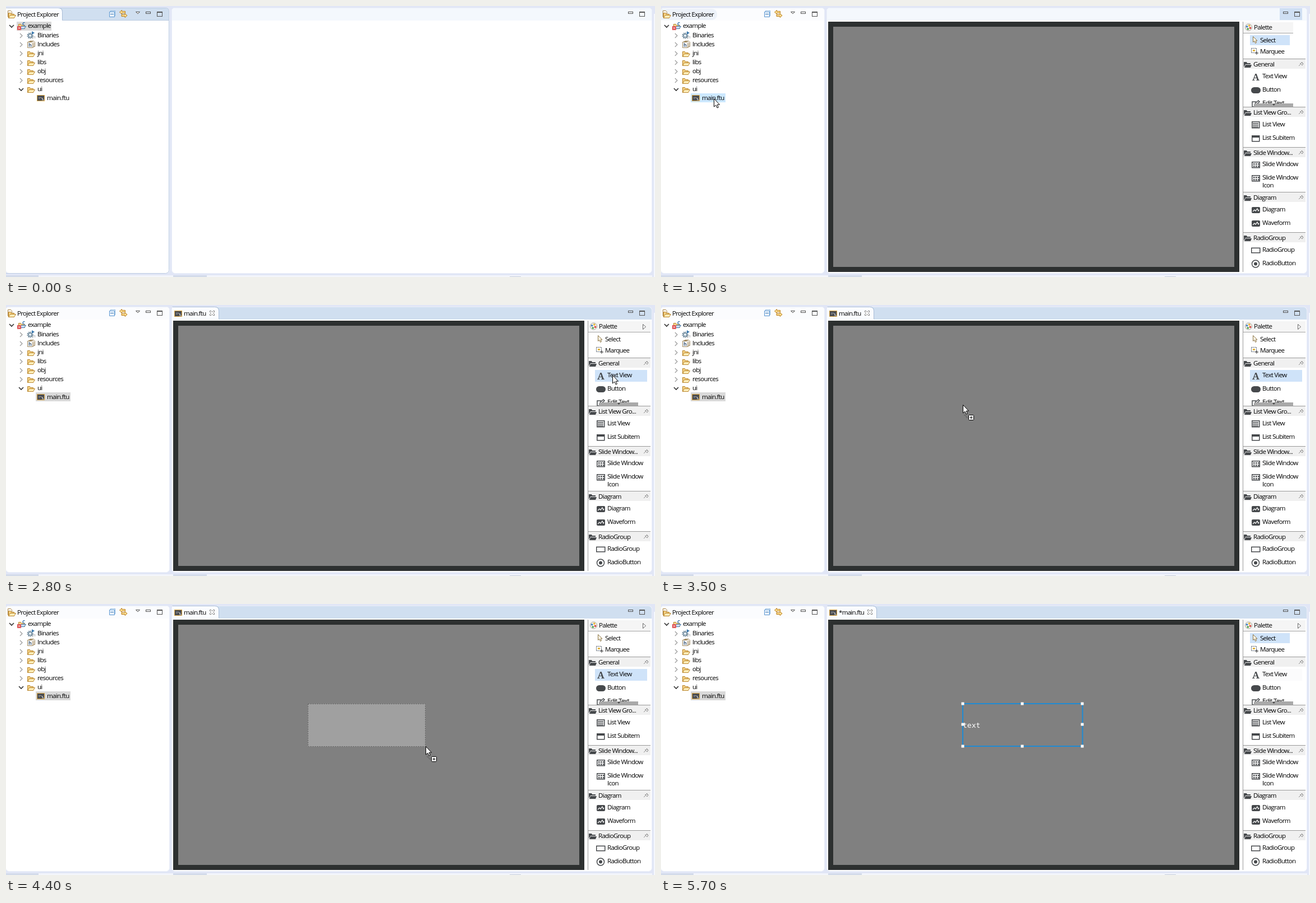
An HTML page with a canvas that plays this animation: 1157 px wide and 484 px high, repeating every 6.5 s.

```html
<!DOCTYPE html>
<html lang="en">
<head>
<meta charset="utf-8">
<title>Adding a text view</title>
<style>
  html, body { margin: 0; width: 100%; height: 100%; overflow: hidden; background: #e1e6f6; }
  canvas { display: block; }
</style>
</head>
<body>
<canvas id="stage" width="1157" height="484"></canvas>
<script>
const LOOP = 6500, STEP = 100;
const ctx = document.getElementById('stage').getContext('2d');

// Pointer legs: start time, then one x,y pair per step; the last pair holds.
const legs = [
  [100, 967,80],
  [300, 720,115, 340,160, 280,160, 177,165, 115,169, 94,165],
  [1600, 115,170, 177,166],
  [2000, 290,175, 460,198, 660,204, 850,194, 980,170, 1056,140, 1079,127],
  [2700, 1081,125],
  [3000, 1040,150, 900,174, 740,187, 620,188, 556,182, 538,178],
  [3700, 575,198, 640,232, 698,255, 727,262, 736,262, 742,260, 745,257],
  [4400, 748,254, 750,252],
  [5300, 786,249],
  [5600, 1146,225]
];

function pointerAt(t) {
  const [start, ...points] = legs.filter(leg => leg[0] <= t).pop();
  const i = Math.min(Math.floor((t - start) / STEP), points.length / 2 - 1);
  return [points[2 * i], points[2 * i + 1]];
}

function rect(color, x, y, w, h) {
  ctx.fillStyle = color;
  ctx.fillRect(x, y, w, h);
}

function box(color, x, y, w, h, width = 1) {
  ctx.strokeStyle = color;
  ctx.lineWidth = width;
  ctx.strokeRect(x, y, w, h);
}

function shape(d, x, y, fill, stroke, width = 1) {
  const path = new Path2D(d);
  ctx.save();
  ctx.translate(x, y);
  ctx.lineWidth = width;
  if (fill) { ctx.fillStyle = fill; ctx.fill(path); }
  if (stroke) { ctx.strokeStyle = stroke; ctx.stroke(path); }
  ctx.restore();
}

function rounded(x, y, w, h, radii, fill, stroke) {
  ctx.beginPath();
  ctx.roundRect(x, y, w, h, radii);
  if (fill) { ctx.fillStyle = fill; ctx.fill(); }
  if (stroke) { ctx.strokeStyle = stroke; ctx.lineWidth = 1; ctx.stroke(); }
}

function disc(x, y, r, fill, stroke, width = 1) {
  ctx.beginPath();
  ctx.arc(x, y, r, 0, 7);
  if (fill) { ctx.fillStyle = fill; ctx.fill(); }
  if (stroke) { ctx.strokeStyle = stroke; ctx.lineWidth = width; ctx.stroke(); }
}

function text(s, x, y, font = '11.5px "Open Sans", sans-serif', color = '#000', spacing = '-0.7px') {
  ctx.font = font;
  ctx.letterSpacing = spacing;
  ctx.fillStyle = color;
  ctx.fillText(s, x, y);
}

function windowButtons(x) {
  box('#555', x + .5, 10.5, 8, 3);
  box('#555', x + 20.5, 10.5, 9, 8);
  rect('#555', x + 20, 10, 10, 2);
}

function panel(x, w, header) {
  rounded(x + .5, 3.5, w, 474, [5, 5, 6, 6], '#fff', '#e9eef8');
  rounded(x + 1, 4, w - 1, 22, [5, 5, 0, 0], header);
}

function tab(x, w) {
  const d = `M0 22V0H${w - 7}q7 0 7 7V22z`;
  shape(d, x, 4, '#fafcff');
  shape(`M0 0H${w - 7}q7 0 7 7V22`, x + .5, 3.5, null, '#a9bcd6');
}

function fileIcon(x, y) {
  rect('#d9a441', x, y, 14, 11);
  rect('#4a4c50', x + 1, y + 1, 12, 9);
  rect('#9a9ca0', x + 3, y + 4, 5, 1);
  rect('#85878b', x + 3, y + 6, 3, 1);
  shape('M8 5l5 5M10 5v5', x, y, null, '#c9c9c9');
}

function treeFolder(x, y) {
  shape('M.5 10.5v-9h4l1 2h5v7z', x, y, '#f3d083', '#b9862f');
  shape('M.5 10.5l3-5h10l-3 5z', x, y, '#ffedb8', '#b9862f');
}

function chevron(x, y, open) {
  if (open) shape('M-4-2l4 4 4-4', x, y, null, '#333', 1.6);
  else shape('M-2-4l4 4-4 4', x, y, null, '#999', 1.2);
}

function explorer(t) {
  const active = t < 1500;
  panel(-1, 292, active ? '#d0dff0' : '#fbfcfe');
  if (active) {
    tab(-1, 101);
    rect('#b9c9df', 100, 25, 191, 1);
    rounded(-.5, 3.5, 291, 474, [0, 5, 6, 0], null, '#bccbe2');
  } else if (t < 1600) {
    rounded(0, 5, 100, 20, [0, 9, 9, 0], '#edf2f9');
  }
  shape('M.5.5h5l2 2v9h-7z', 3, 8, '#fff', '#a88344');
  treeFolder(4, 11);
  text('Project Explorer', 20, 19);

  box('#8db8e0', 186.5, 8.5, 8, 9);
  shape('M.5.5h9v9h-9z', 184, 10, '#eaf4ff', '#5d97cf');
  rect('#3f76ad', 186, 14, 6, 1);
  shape('M.5 4l4-3.5v2h6v3h-6v2z', 202, 7, '#ffe39a', '#b87912');
  shape('M14 9l-4-3.5v2H4v3h6v2z', 202, 8, '#ffe39a', '#b87912');
  shape('M.5.5h7l-3.5 3.5z', 231, 10, '#fff', '#555');
  windowButtons(249);

  if (t < 800) rect('#d9d9d9', 19, 28, 62, 16);
  else rect(t < 1600 ? '#cce8ff' : '#d9d9d9', 53, 156, 62, 16);

  chevron(10, 36, true);
  shape('M.5 9.5v-8h4l1 2h6v6z', 22, 31, '#f6d68f', '#b9862f');
  shape('M.5 6.5l3-4h10l-3 4z', 22, 34, '#cfe2f7', '#3c73ad');
  text('C', 29, 35, 'bold 8px "Open Sans", sans-serif', '#2866a5', '0px');
  rect('#dc4a4c', 20, 36, 7, 7);
  shape('M1.5 1.5l4 4M5.5 1.5l-4 4', 20, 36, null, '#fff');
  text('example', 39, 39);

  ['Binaries', 'Includes', 'jni', 'libs', 'obj', 'resources', 'ui'].forEach((name, i) => {
    const y = 52 + 16 * i;
    chevron(27, y + 1, name === 'ui');
    if (i > 1) treeFolder(38, y - 4);
    text(name, 56, y + 4);
  });
  ctx.setLineDash([1.5, 1.5]);
  disc(43, 53, 4.5, null, '#45677f', 2);
  ctx.setLineDash([]);
  disc(43, 53, 3, '#e4edf3', '#45677f');
  shape('M0 0l5 3-5 3z', 46, 45, '#3a78ad');
  text('01', 46, 58, '6px "Open Sans", sans-serif', '#55606a', '0px');
  for (const i of [2, 1, 0]) shape('M.5.5h7l2 2v8h-9z', 38 + 2 * i, 64 - i, '#fff', '#a18a60');
  text('h', 40, 73, 'bold 9px "Open Sans", sans-serif', '#3b5878', '0px');
  fileIcon(55, 159);
  text('main.ftu', 73, 168);
}

const sections = [
  ['General', 104, [['Text View', 125], ['Button', 149], ['Edit Text', 173]]],
  ['List View Gro...', 190, [['List View', 211], ['List Subitem', 235]]],
  ['Slide Window...', 262, [['Slide Window', 282], ['Slide Window', 306], ['Icon', 320]]],
  ['Diagram', 342, [['Diagram', 363], ['Waveform', 387]]],
  ['RadioGroup', 414, [['RadioGroup', 435], ['RadioButton', 459]]]
];

const DARK = '#46494c';

function paletteIcons() {
  text('A', 1054, 133, 'bold 17px "Noto Serif", serif', DARK, '0px');
  rounded(1052, 145, 17, 11, 5.5, DARK);
  shape('M8 2H1v9h11V7M5 8l1-3 6-5 2 2-6 5z', 1053, 169, null, DARK, 1.5);
  box(DARK, 1053.75, 206.75, 13, 11, 1.5);
  for (const y of [209, 212, 215]) rect(DARK, 1055, y, 10, 1.5);
  box(DARK, 1053.75, 231.75, 13, 10, 1.5);
  rect(DARK, 1053, 231, 14, 4);
  for (const y of [278, 302]) {
    box(DARK, 1053.75, y + .75, 13.5, 10, 1.5);
    for (const x of [1056, 1060, 1064])
      for (const dy of [3, 7]) rect(DARK, x, y + dy, 2.5, 2.5);
  }
  for (const y of [359, 383]) {
    rounded(1053, y, 15, 11, 2, DARK);
    shape('M2 8l3-3 2 2 3-4 2 4 1-2', 1053, y, null, '#fff', 1.2);
  }
  box(DARK, 1052.75, 432.25, 15, 8.5, 1.5);
  disc(1060, 460.5, 6.5, null, DARK, 1.5);
  disc(1060, 460.5, 3, DARK);
}

function palette(t) {
  const ready = t >= 1600;
  rect('#9a9a9a', 1037, 28, 1, 447);
  rect('#f5f5f5', 1038, 29, ready ? 111 : 89, 19);
  rect('#a5a5a5', 1038, 48, ready ? 111 : 89, 1);
  if (ready) shape('M.5.5l5 4.5-5 4.5z', 1135, 34, '#fff', '#666');
  disc(1047.5, 38, 6, '#f3f1ea', '#aaa79d');
  ['#d9433f', '#49a04c', '#3d7fc8', '#eab531'].forEach((c, i) =>
    disc(1047.5 + 3.2 * Math.cos(i * 1.57 + .4), 38 + 3.2 * Math.sin(i * 1.57 + .4), 1.8, c));
  text('Palette', 1057, 42);

  const textTool = t >= 2700 && t < 4900;
  if (!textTool) rect('#cfe3f9', 1050, 52, 71, 18);
  if (t >= 2600) rect(textTool ? '#cfe3f9' : t < 2700 ? '#eef5fd' : '#fbfbfc', 1050, 116, 93, 21);
  shape('M.5.5v10l2.5-2 1.5 4 2-1-1.5-3.5h3z', 1055, 54, '#fff9e6', '#8a7448');
  text('Select', 1068, 65);
  ctx.setLineDash([2, 1]);
  box('#4b5560', 1052.5, 75.5, 9, 8);
  ctx.setLineDash([]);
  rect('#e2b545', 1055, 78, 4, 3);
  shape('M0 3h6M3 0v6', 1059, 81, null, '#333');
  text('Marquee', 1068, 85);

  for (const [title, y, items] of sections) {
    const top = y - 9;
    for (const [label, itemY] of items) text(label, 1072, itemY + 4);
    rect('#f0f0f0', 1038, top, 111, 17);
    rect('#999', 1038, top - 1, 111, 1);
    shape('M0 9V0h5l1 2h6v2H3z M1 10l2-5h11l-2 5z', 1039, y - 4, DARK);
    text(title, 1056, y + 4);
    shape('M0 7l3-3M2 2l4 4M3 3l2-2 3 2-2 3M5 0l3 3', 1137, y - 4, null, '#8b8b8b');
  }
  paletteIcons();
  rect('#a9a9a9', 1058, 174, 69, 6);
  shape('M0 0h5l-2.5 3z', 1090, 175, '#444');
  rect('#999', 1038, 180, 111, 1);
  rect('#f0f0f0', 1038, 181, 111, 4);
}

function editor(t) {
  const hasTab = t >= 1600, dirty = t >= 4900;
  panel(295, 856, hasTab ? '#d0dff0' : '#f4f8fd');
  if (t >= 1500 && !hasTab) rect('#cfdff3', 1103, 4, 40, 21);
  windowButtons(1109);
  if (hasTab) {
    const w = dirty ? 88 : 83;
    tab(296, w);
    fileIcon(300, 10);
    text(dirty ? '*main.ftu' : 'main.ftu', 317, 19);
    shape('M.5.5h2l2 2 2-2h2v2l-2 2 2 2v2h-2l-2-2-2 2h-2v-2l2-2-2-2z', 280 + w, 10, '#fff', '#777');
  }
  if (t < 1500) return;
  rect('#2d3030', 298, 28, 733, 447);
  rect('#808080', 307, 37, 715, 429);
  palette(t);
}

function marquee(x, y) {
  rect('#a0a0a0', 538, 178, x - 538, y - 177);
  ctx.setLineDash([2, 2]);
  box('#5c5c5c', 538.5, 178.5, x - 539, y - 178);
  ctx.setLineDash([]);
}

function textWidget() {
  box('#1f8bd3', 538, 178, 213.5, 76, 2);
  text('text', 538, 221, '13px "DejaVu Sans Mono", monospace', '#fff', '0px');
  for (const x of [538, 644, 751])
    for (const y of [178, 215, 254])
      if (x !== 644 || y !== 215) rect('#fff', x - 2.5, y - 2.5, 5, 5);
}

function pointer(t, x, y) {
  if (t >= 1000 && t < 1200) {
    disc(x + .5, y + 1.5, 8.5, null, '#2d8fd5', 3.5);
    ctx.beginPath();
    ctx.arc(x + .5, y + 1.5, 8.5, -1.6, .6);
    ctx.strokeStyle = '#9fdcf7';
    ctx.stroke();
    return;
  }
  if (t >= 5000 && t < 5300) {
    shape('M.5.5h6l-2 2 7 7 2-2v6h-6l2-2-7-7-2 2z', x - 7, y - 6, '#fff', '#000');
    return;
  }
  shape('M.5.5v14.5l3.3-3 2.4 5 2.2-1-2.3-4.8h4.4z', x, y, '#fff', '#000');
  if (t >= 3000 && t < 4900 && x < 1031) {
    ctx.setLineDash([1, 1]);
    shape('M2 18l7 7M4 18l5 5', x, y, null, '#444');
    ctx.setLineDash([]);
    rounded(x + 10.5, y + 18.5, 9, 9, 1, '#fff', '#000');
    shape('M12.5 23h5M15 20.5v5', x, y, null, '#000');
  }
}

function draw(t) {
  rect('#e1e6f6', 0, 0, 1157, 484);
  rect('#f3f5fb', 0, 481, 1152, 3);
  rect('#d3dbea', 0, 481, 58, 3);
  rect('#d3dbea', 298, 481, 60, 3);
  rect('#c3cbd9', 898, 483, 20, 1);
  rect('#f6f8fd', 1155, 14, 2, 470);
  explorer(t);
  editor(t);
  const visible = t >= 100 && t < 5700;
  const [x, y] = visible ? pointerAt(t) : [0, 0];
  if (t >= 3700 && t < 4900) marquee(x, y);
  if (t >= 4900) textWidget();
  if (visible) pointer(t, x, y);
}

const begin = performance.now();
function frame() {
  const t = (performance.now() - begin) % LOOP;
  draw(Math.floor(t / STEP) * STEP);
  requestAnimationFrame(frame);
}
frame();
</script>
</body>
</html>
```
